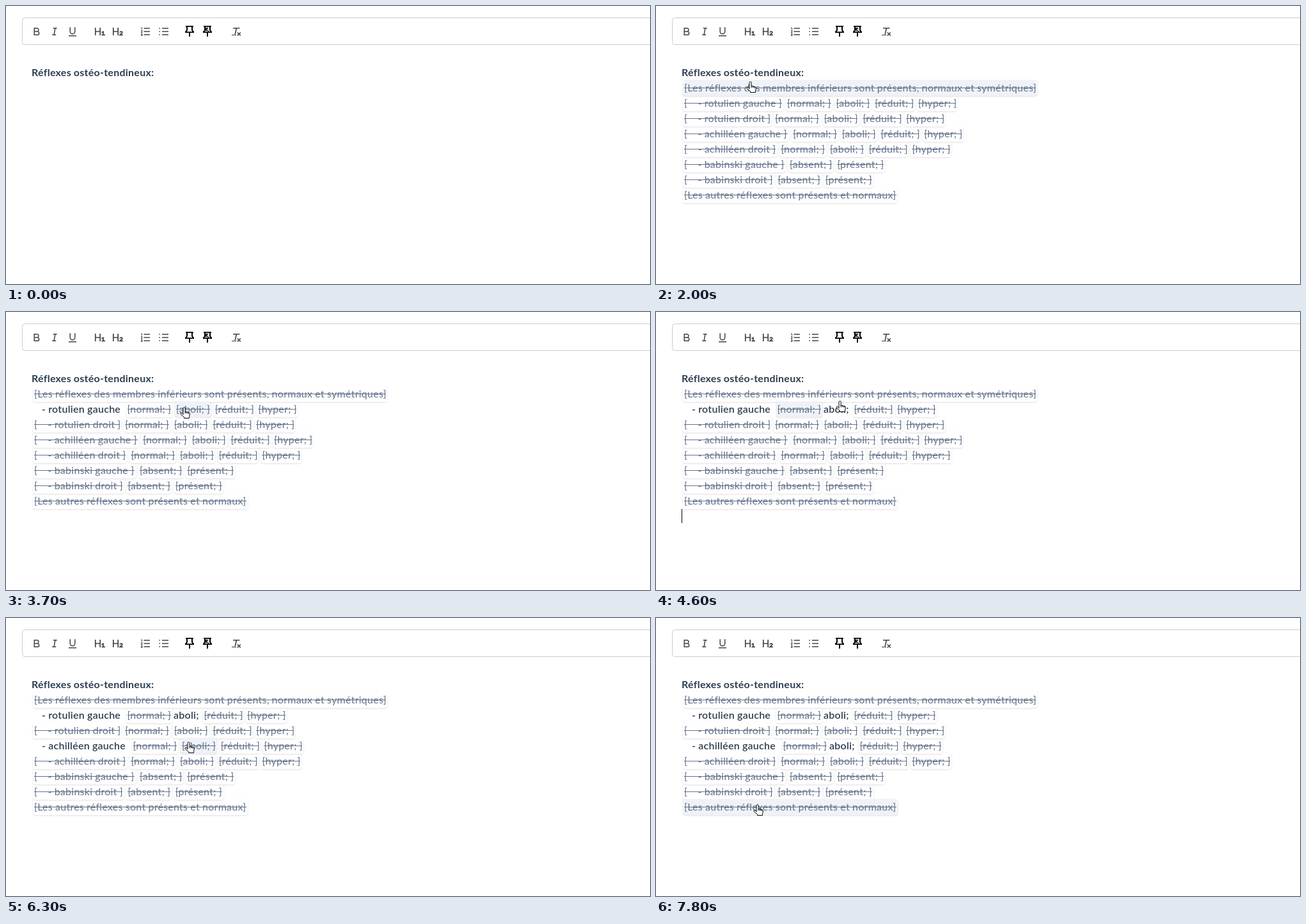
These frames come from a looping animation (1007 by 436 pixels, 8000 ms). An HTML page:

```html
<!DOCTYPE html>
<html lang="fr">
<head>
<meta charset="utf-8">
<title>Réflexes</title>
<style>
  html, body { margin: 0; width: 100%; height: 100%; overflow: hidden; background: #fff; }
  body { position: relative; font: 16px/24px Lato, "Noto Sans", sans-serif; letter-spacing: .26px; word-spacing: -.3px; color: #2c3e50; }
  body > * { position: absolute; }
  #toolbar, #list { left: 0; top: 0; }
  h1 { left: 40px; top: 92px; margin: 0; font: inherit; font-weight: 700; white-space: pre; }
  .row { position: absolute; left: 40px; display: flex; }
  .chip {
    flex: none; height: 25px; margin: 0 2px; padding: 0 2px; border-radius: 4px; white-space: pre; color: #64748b;
    background: linear-gradient(#64748b, #64748b) 0 12px / 100% 1px no-repeat content-box;
    box-shadow: 0 1px 3px rgba(0, 0, 0, .1), 0 1px 2px -1px rgba(0, 0, 0, .1);
  }
  .chip.on { margin: 0; padding: 0; color: inherit; font-weight: 600; background: none; box-shadow: none; }
  .chip.hover { background-color: #eff3f8; }
  .chip.on.hover { padding: 0 2px; box-shadow: 0 1px 3px rgba(0, 0, 0, .1); }
  #caret { left: 40px; top: 309px; width: 1px; height: 22px; background: #000; }
  .cursor { left: 0; top: 0; overflow: visible; fill: #fff; stroke: #000; stroke-linejoin: round; stroke-linecap: round; }
</style>
</head>
<body>
<svg id="toolbar" width="1007" height="70" fill="#444">
  <rect x="25.5" y="18.5" width="1000" height="42" rx="4" fill="none" stroke="#ccc"/>
  <g transform="translate(39 31) scale(.75)"><path d="M8 11h4.5a2.5 2.5 0 1 0 0-5H8zm10 4.5a4.5 4.5 0 0 1-4.5 4.5H6V4h6.5a4.5 4.5 0 0 1 3.26 7.6A4.5 4.5 0 0 1 18 15.5zM8 13v5h5.5a2.5 2.5 0 1 0 0-5z"/></g>
  <g transform="translate(67 31) scale(.75)"><path d="M15 20H7v-2h2.93l2.11-12H9V4h8v2h-2.93l-2.11 12H15z"/></g>
  <g transform="translate(95 31) scale(.75)"><path d="M8 3v9a4 4 0 1 0 8 0V3h2v9a6 6 0 1 1-12 0V3zM4 20h16v2H4z"/></g>
  <g fill="none" stroke="#444" stroke-width="1.7">
    <path d="M139.8 34v12M147.2 34v12M139.8 40h7.4M149.5 41.6l2.5-1.2v5M149.5 45.4h5.5"/>
    <path d="M167.8 34v12M175.2 34v12M167.8 40h7.4M178 41.5q.6-1.6 2.4-1.4 2.2.5 1 2.4l-3.2 2.9h4.6"/>
    <path stroke-width="1.5" d="M215.5 35h9.5M215.5 40h9.5M215.5 45h9.5M244 35h10M244 40h10M244 45h10"/>
    <path stroke-width="1" d="M211 34h1.5v3M211 38.5h2v1.4l-2 1.3v.3h2.5M211 43.5h2v3h-2M211 45h2"/>
    <path stroke-width="1.6" d="M239.4 35h1.6M239.4 40h1.6M239.4 45h1.6"/>
    <path stroke-width="1.6" d="M355 34.8h10.5M360.3 35l-2.1 9.5"/>
    <path stroke-width="1.1" d="M353 45.5h7"/>
    <path d="M361.8 41.5l5 5M366.8 41.5l-5 5"/>
  </g>
  <g id="pin" transform="translate(275 28.4) scale(1 .85)" fill="#000"><path d="M18 3v2h-1v6l2 3v2h-6v7h-2v-7H5v-2l2-3V5H6V3zM9 5v6.6L7.4 14h9.2L15 11.6V5z"/></g>
  <use href="#pin" x="28"/>
  <path d="M312.8 39.5v-5h2.6l-2 2.6 4 3.2" fill="none" stroke="#000" stroke-width="1.2"/>
</svg>
<h1>Réflexes ostéo-tendineux:</h1>
<div id="list"></div>
<div id="caret"></div>
<svg id="hand" class="cursor" width="17" height="19"><path d="M5 11.5V2.3a1.6 1.6 0 0 1 3.2 0V7.5l5.4 1.1q2 .5 1.8 2.4l-.9 4.5v2H6.6v-1.6L1.3 11.4q-.9-1.5.6-2 1.1-.2 3.1 2.1M8.2 7.5V10M10.8 8v2M13.2 8.6v1.9"/></svg>
<svg id="beam" class="cursor" width="9" height="18"><path fill="none" d="M1 1.5h2.5l1 1 1-1H8M4.5 2.5v13M1 16.5h2.5l1-1 1 1H8"/></svg>
<script>
const LOOP = 8000;
const $ = id => document.getElementById(id);

// Each chip: label, width when struck out, width when chosen.
const reflex = [["normal; ", 68.5], ["aboli; ", 52.8, 43.6], ["réduit; ", 59.7], ["hyper; ", 59.3]];
const sign = [["absent; ", 66.4], ["présent; ", 73]];
const item = (name, ...widths) => ["    - " + name + " ", ...widths];
const rows = [
  [["Les réflexes des membres inférieurs sont présents, normaux et symétriques", 550]],
  [item("rotulien gauche", 153, 145.5), ...reflex],
  [item("rotulien droit", 134.2), ...reflex],
  [item("achilléen gauche", 162.2, 154.5), ...reflex],
  [item("achilléen droit", 143.4), ...reflex],
  [item("babinski gauche", 157), ...sign],
  [item("babinski droit", 138.4), ...sign],
  [["Les autres réflexes sont présents et normaux", 332]]
];

const listStart = 1300;
const choices = { "1.0": 3000, "1.2": 4200, "3.0": 5600, "3.2": 6800 };
const caretSpans = [[1300, 1900], [2500, 3600], [4200, 4700], [5300, 6200], [6800, 7400]];

// Pointer: time, centre x, centre y, hovered chip (row.column).
const pointer = [
  [1000, 30, 246], [1100, 69, 264],
  [1400, 72, 271, "6.0"],
  [1800, 84, 245, "5.0"], [1900, 125, 172, "2.0"], [2000, 149, 127, "0.0"],
  [2200, 150, 125, "0.0"], [2300, 149, 128, "0.0"], [2400, 146, 138, "0.0"], [2500, 141, 152, "1.0"], [2600, 138, 160, "1.0"],
  [3300, 144, 160, "1.0"], [3400, 168, 161, "1.0"], [3500, 208, 161, "1.1"], [3600, 250, 160, "1.1"], [3700, 280, 158, "1.2"], [3800, 290, 156, "1.2"],
  [4600, 289, 148, "1.1"], [4700, 245, 160, "1.1"], [4800, 190, 178, "2.1"], [4900, 140, 198, "3.0"], [5000, 120, 206, "3.0"],
  [5800, 165, 209, "3.0"], [5900, 230, 209, "3.1"], [6000, 283, 207, "3.2"],
  [6200, 285, 205, "3.2"], [6300, 287, 203, "3.2"],
  [7100, 278, 214, "3.2"], [7200, 245, 245, "5.1"], [7300, 190, 286], [7400, 156, 314, "7.0"],
  [7700, 158, 308, "7.0"], [7800, 160, 301, "7.0"]
];

const chips = {};
rows.forEach((row, r) => {
  const line = $("list").appendChild(document.createElement("div"));
  line.className = "row";
  line.style.top = 116 + 24 * r + "px";
  row.forEach(([label, width, chosenWidth], c) => {
    const el = line.appendChild(document.createElement("span"));
    chips[r + "." + c] = { el, label, width, chosenWidth };
  });
});

const show = (el, visible) => { el.style.display = visible ? "" : "none"; };

function place(el, visible, x, y) {
  show(el, visible);
  if (visible) el.style.transform = `translate(${x}px, ${y}px)`;
}

function render(t) {
  const [, x, y, hover] = pointer.findLast(step => step[0] <= t) || [];
  for (const [key, chip] of Object.entries(chips)) {
    const on = t >= choices[key];
    chip.el.className = "chip" + (on ? " on" : "") + (key === hover ? " hover" : "");
    chip.el.textContent = on ? chip.label : `[${chip.label}]`;
    chip.el.style.width = (on ? chip.chosenWidth : chip.width) + "px";
  }
  show($("list"), t >= listStart);
  show($("caret"), caretSpans.some(([from, to]) => t >= from && t < to));
  place($("beam"), t >= 1000 && t < 1400, x - 4, y - 9);
  place($("hand"), t >= 1400, x - 8, y - 9);
}

let shown = -1;
function tick() {
  const t = Math.floor(performance.now() % LOOP / 100) * 100;
  if (t !== shown) render(shown = t);
  requestAnimationFrame(tick);
}
tick();
</script>
</body>
</html>
```
